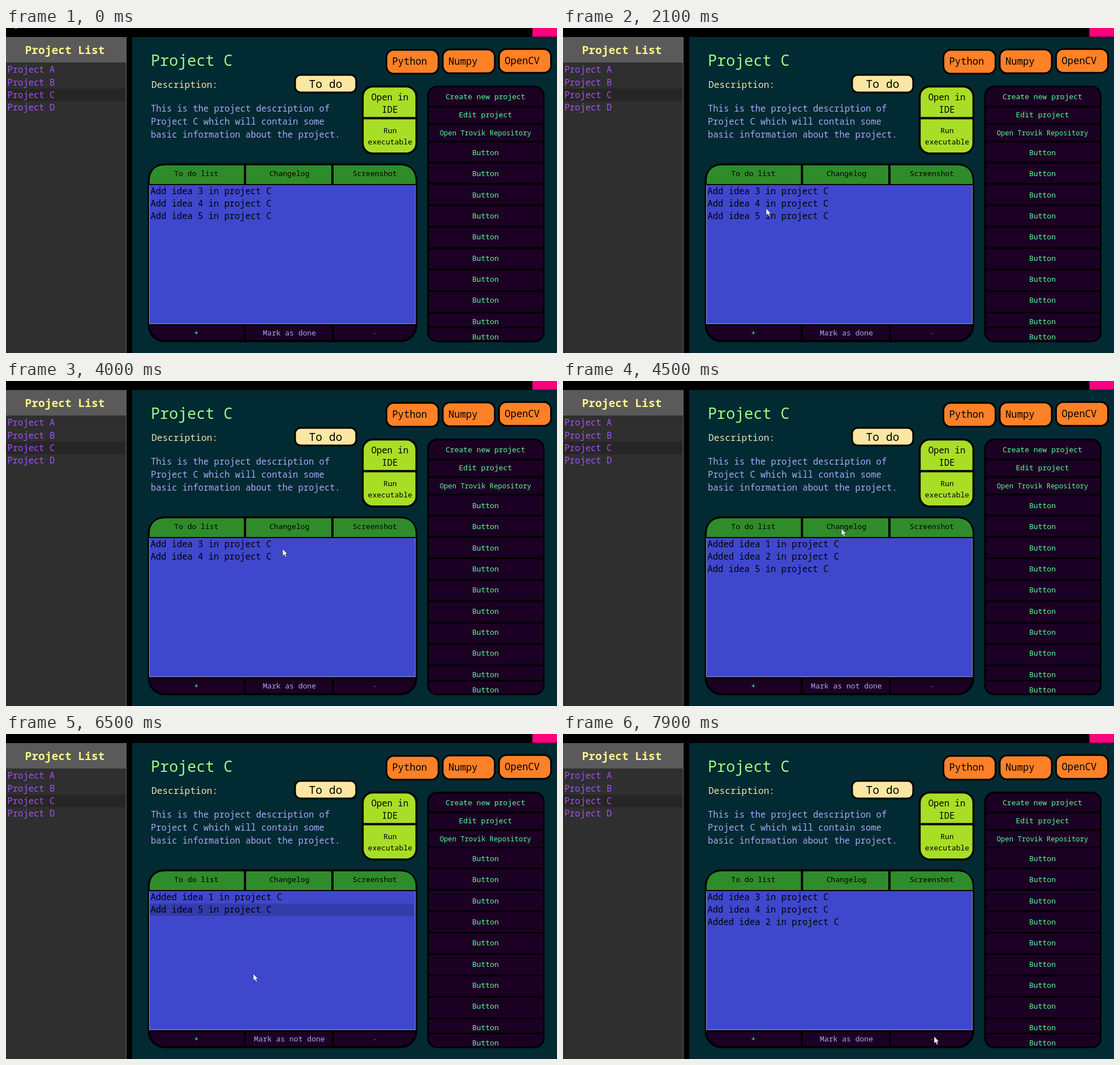
An HTML page that plays this animation: 974 px wide and 575 px high, repeating every 8000 ms.

```html
<!DOCTYPE html>
<html lang="en">
<head>
<meta charset="utf-8">
<title>Project manager</title>
<style>
  html, body { margin: 0; width: 100%; height: 100%; overflow: hidden; background: #000; }
  svg { display: block; font-family: "Noto Sans Mono", monospace; }
  text { white-space: pre; }
</style>
</head>
<body>
<svg id="stage" width="974" height="575" viewBox="0 0 974 575"></svg>
<script>
const LOOP = 8000, STEP = 100, FLASH = 400;
const MINT = '#58fc98', LILAC = '#aaa8f6', PLUM = '#1c0024';
const SMALL = 13.05, BODY = 15.5, LARGE = 19.6, ROW = 22.4;
const stage = document.getElementById('stage');

function add(tag, attrs, text) {
  const el = document.createElementNS('http://www.w3.org/2000/svg', tag);
  for (const k in attrs) el.setAttribute(k, attrs[k]);
  if (text !== undefined) el.textContent = text;
  return stage.appendChild(el);
}
const box = (x, y, width, height, fill, more) => add('rect', { x, y, width, height, fill, ...more });
const pill = (x, y, w, h, rx, fill, line = 3) =>
  box(x, y, w, h, fill, { rx, stroke: '#000', 'stroke-width': line });
const path = (d, stroke, width, fill = 'none') =>
  add('path', { d, stroke, fill, 'stroke-width': width });
// y is the middle of the capital letters
const label = (text, x, y, size, fill, more) =>
  add('text', { x, y: y + size * 0.357, 'font-size': size, fill, ...more }, text);
const centered = (text, x, y, size, fill, more) =>
  label(text, x, y, size, fill, { 'text-anchor': 'middle', ...more });

// Window and sidebar
box(0, 0, 974, 575, '#000');
box(930.5, 0, 43.5, 15.5, '#ff007f');
box(0, 16, 212, 559, '#2f2f2f');
box(0, 16, 212, 45, '#5a5a5a');
box(0, 107.5, 211, 22, '#262626');
box(212, 16, 1, 559, '#6a6a6a');
centered('Project List', 104, 39, LARGE, '#fbf58a', { 'font-weight': 700 });
[...'ABCD'].forEach((c, i) => label('Project ' + c, 2.5, 73.7 + i * ROW, BODY, '#a550f5'));

// Project header
box(223, 16, 751, 559, '#012a32');
label('Project C', 256, 57.5, 26.8, '#9dfc86');
label('Description:', 257, 99.7, 16.3, '#f1e5ae');
['This is the project description of',
 'Project C which will contain some',
 'basic information about the project.'
].forEach((s, i) => label(s, 256, 142.5 + i * 23, BODY, LILAC));
pill(511, 83, 108, 31, 10, '#fbe7a3');
centered('To do', 565, 99, LARGE, '#000');
['Python', 'Numpy', 'OpenCV'].forEach((s, i) => {
  const x = 672.5 + i * 99.5, y = 38.8 - i * 0.8;
  pill(x, y, 92, 42, 13, '#ff8127');
  label(s, x + 10, y + 20.5, 17.2, '#000');
});
pill(630.5, 103.5, 95, 118.5, 18, '#a9de26', 3.5);
path('M630 159.5H726', '#000', 4);
['Open in', 'IDE'].forEach((s, i) => centered(s, 678.5, 122 + i * 22.5, 15.6, '#000'));
['Run', 'executable'].forEach((s, i) => centered(s, 679, 181 + i * 20, SMALL, '#000'));

// Button column
pill(746, 103.5, 204.5, 451, 16, PLUM);
const rule = y => path(`M746 ${y}H951`, '#000', 3);
['Create new project', 'Edit project', 'Open Trovik Repository'].forEach((s, i) => {
  centered(s, 847.5, 121.5 + i * 32.2, i < 2 ? SMALL : 12.25, MINT);
  rule(139 + i * 31);
});
for (let i = 0; i < 10; i++) {
  centered('Button', 847.5, Math.min(220.5 + i * 37.3, 546.5), SMALL, MINT);
  if (i) rule(Math.min(200 + i * 37.9, 530));
}

// List panel
pill(252.5, 241.5, 472.5, 312.5, 28, PLUM, 4);
path('M254 277V268Q256 243 282 243H696Q722 243 724 268V277Z', 'none', 0, '#2f8c2a');
path('M422.5 241V277M577 241V277M422 525V554M578 525V554', '#000', 4);
box(251, 276, 475.5, 250.5, '#000');
box(253, 278, 471, 246, '#3f48cc');
path('M253.5 278V523.2H723.5V278', '#8f92b8', 1);
const columns = [336.5, 501, 652];
['To do list', 'Changelog', 'Screenshot']
  .forEach((s, i) => centered(s, columns[i], 257.5, SMALL, '#000'));
const [, mark] = [['+', MINT], ['', LILAC], ['-', '#c2205c']]
  .map(([s, fill], i) => centered(s, columns[i], 539.3, SMALL, fill));

const glow = box(254, 0, 467, 22, '#343cab');
const rows = [0, 1, 2].map(i => label('', 255.5, 288 + i * ROW, BODY, '#000'));
const cursor = path('M0 0V12.5L2.8 10L5 14.8L7 13.9L5 9.3H8.6Z', '#1c1c30', 0.7, '#fff');

// What the user does: [time, action, value]
const actions = [
  [1000, 'open', 'log'], [1900, 'open', 'todo'],
  [2600, 'select', 2], [3500, 'move'],
  [4400, 'open', 'log'], [5200, 'select', 1],
  [6100, 'select', 1], [6300, 'move'], [6900, 'open', 'todo']
];

// Mouse trips between targets: [leave, arrive, x, y]
const trips = [
  [100, 800, 427, 264],
  [1200, 1400, 338, 252],
  [1900, 2200, 362, 329],
  [2700, 3300, 466, 526],
  [3600, 4200, 492, 261],
  [4600, 5000, 478, 320],
  [5200, 5700, 496, 525],
  [6400, 6800, 342, 261],
  [7000, 7500, 675, 554],
  [7600, 7900, 656, 535]
];

const easeOut = k => Math.sin(k * Math.PI / 2);

function pointer(t) {
  let x = 12, y = -13;
  for (const [leave, arrive, tx, ty] of trips) {
    if (t < leave) break;
    const k = easeOut(Math.min(1, (t - leave) / (arrive - leave)));
    x += (tx - x) * k;
    y += (ty - y) * k;
  }
  return [Math.round(x), Math.round(y)];
}

// Replays the actions up to time t
function appAt(t) {
  const lists = {
    todo: [3, 4, 5].map(n => `Add idea ${n} in project C`),
    log: [1, 2].map(n => `Added idea ${n} in project C`)
  };
  let tab = 'todo', row = -1, touched = 0;
  for (const [at, action, value] of actions) {
    if (at > t) break;
    touched = at;
    if (action === 'open') { tab = value; row = -1; }
    if (action === 'select') row = value;
    if (action === 'move') {
      lists[tab === 'todo' ? 'log' : 'todo'].push(...lists[tab].splice(row, 1));
      row = Math.min(row, lists[tab].length - 1);
    }
  }
  return { tab, row, items: lists[tab], lit: row >= 0 && t < touched + FLASH };
}

function draw(now) {
  const t = Math.floor((now % LOOP) / STEP) * STEP;
  const { tab, row, items, lit } = appAt(t);
  rows.forEach((r, i) => { r.textContent = items[i] || ''; });
  mark.textContent = tab === 'todo' ? 'Mark as done' : 'Mark as not done';
  glow.setAttribute('y', 277.5 + row * ROW);
  glow.setAttribute('visibility', lit ? 'visible' : 'hidden');
  cursor.setAttribute('transform', `translate(${pointer(t)})`);
}

let start;
function tick(now) {
  start ??= now;
  draw(Math.max(0, now - start));
  requestAnimationFrame(tick);
}
draw(0);
requestAnimationFrame(tick);
</script>
</body>
</html>
```
